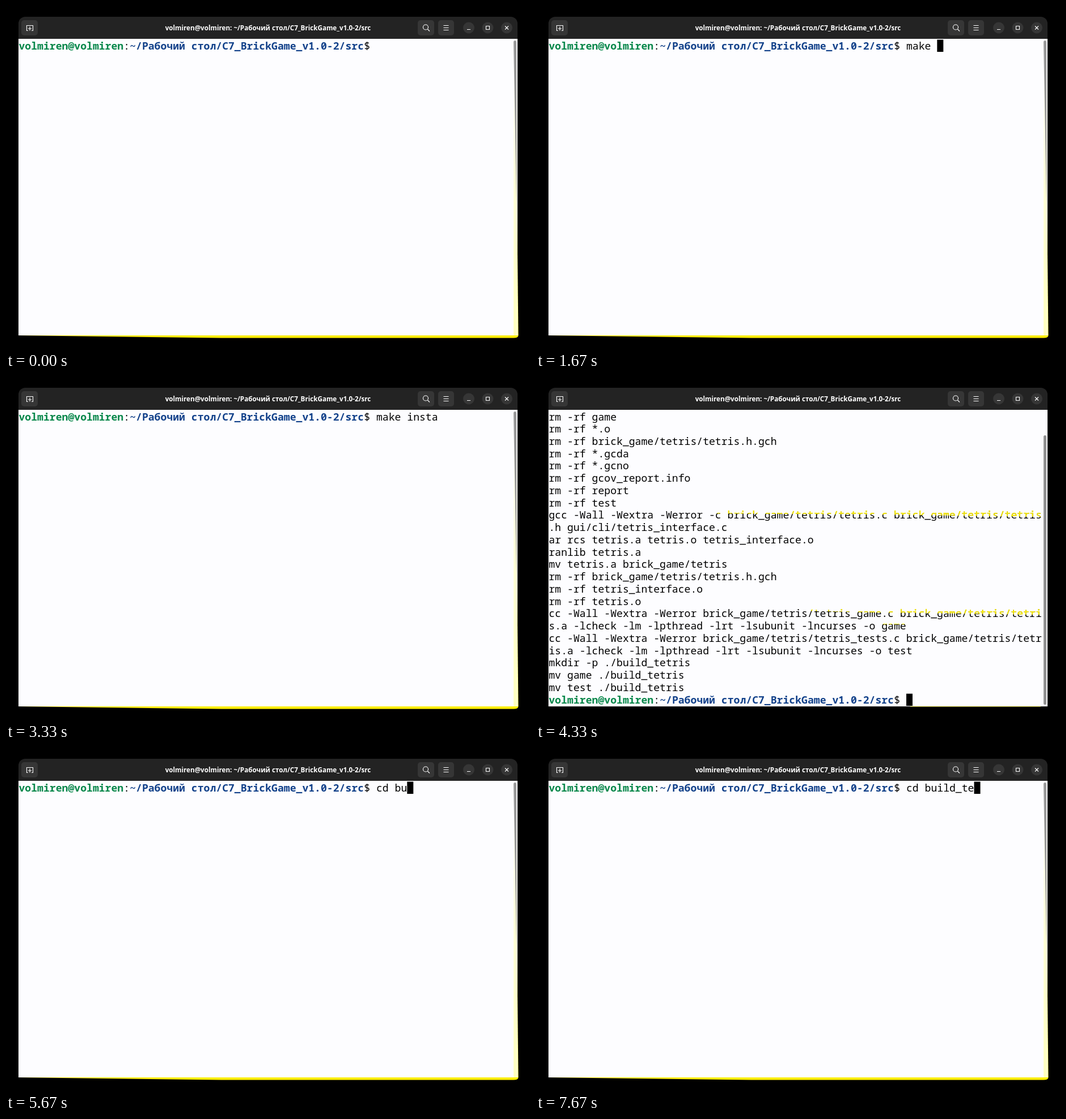
Animation of 924 by 606 pixels, one loop 8000 ms. Source, as an HTML page:

```html
<!DOCTYPE html>
<html lang="ru">
<head>
<meta charset="utf-8">
<style>
  html, body { margin: 0; width: 100%; height: 100%; overflow: hidden; background: #000; }
  svg { display: block; }
  text { white-space: pre; }
  .term text { font: 18.12px "Noto Sans Mono", monospace; }
  .term .b { font-weight: 700; }
  .title { font: 700 11.65px "Open Sans", sans-serif; fill: #fff; text-anchor: middle; }
  .icon { fill: none; stroke: #fff; stroke-width: 1.1; }
</style>
</head>
<body>
<svg width="924" height="606" viewBox="0 0 924 606">
  <defs>
    <linearGradient id="strip" x1="0" y1="0" x2="0" y2="1">
      <stop offset="0" stop-color="#fdfdff"/>
      <stop offset=".4" stop-color="#ffffdc"/>
      <stop offset="1" stop-color="#ffffc0"/>
    </linearGradient>
    <clipPath id="tint">
      <path d="M300 230H890V247L600 243L300 241Z M470 404H890V420L600 416L470 413Z M600 428H655V437H600Z"/>
    </clipPath>
  </defs>
  <rect width="924" height="606"/>
  <path d="M22 59V31A12 12 0 0 1 34 19H890A12 12 0 0 1 902 31V59Z" fill="#232323"/>
  <g fill="#363636">
    <rect x="27" y="25" width="29" height="27" rx="5"/>
    <rect x="726" y="25" width="29" height="27" rx="5"/>
    <rect x="762" y="25" width="28" height="27" rx="5"/>
    <circle cx="816" cy="38.5" r="10"/>
    <circle cx="849.5" cy="38.5" r="10"/>
    <circle cx="883" cy="38.5" r="10"/>
  </g>
  <path class="icon" d="M39 43.5H36.5V34.5H47.5V43.5H45 M42 36.5V43.5 M38.8 40H45.2
    M743.5 41L747 44.5 M771.5 34.5H780.5 M771.5 38.5H780.5 M771.5 42.5H780.5
    M813 41.5H819 M846.5 35.5H852.5V41.5H846.5Z M880 35.5L886 41.5 M886 35.5L880 41.5"/>
  <circle class="icon" cx="740" cy="37.5" r="4.5"/>
  <text class="title" x="462" y="42.5"></text>
  <rect x="22" y="58" width="880" height="524" fill="#fdfdff"/>

  <g id="blank">
    <rect x="895" y="100" width="6" height="482" fill="url(#strip)"/>
    <path d="M895 64Q895 61 897.5 61T900 64L900.5 370L898 230Z" fill="#999"/>
    <path d="M901 340L903.5 582H902Z" fill="#ffff80"/>
    <path d="M22 582H903.5Q903 586.5 895 586.5H380Z" fill="#ffee00"/>
  </g>
  <g id="full">
    <rect x="895" y="103" width="5" height="476" rx="2.5" fill="#929292"/>
    <path d="M660 582H890" stroke="#f4ec50"/>
  </g>

  <g class="term">
    <g id="log"></g>
    <g id="logTint" fill="#fff000" stroke="#fff000" stroke-width=".4" clip-path="url(#tint)"></g>
    <g id="line">
      <text class="b" y="17" fill="#07874a"></text>
      <text y="17"></text>
      <text class="b" y="17" fill="#12418a"></text>
      <text y="17"></text>
      <rect id="cursor" width="11" height="21.5"/>
    </g>
  </g>
</svg>
<script>
const $ = s => document.querySelector(s);
const LEFT = 22.5, TOP = 59.5, CELL = 10.87, ROW = 21.74, LOOP = 8000;
const user = "volmiren@volmiren", path = "~/Рабочий стол/C7_BrickGame_v1.0-2/src";
const promptLen = user.length + path.length + 3;

const output = `rm -rf game
rm -rf *.o
rm -rf brick_game/tetris/tetris.h.gch
rm -rf *.gcda
rm -rf *.gcno
rm -rf gcov_report.info
rm -rf report
rm -rf test
gcc -Wall -Wextra -Werror -c brick_game/tetris/tetris.c brick_game/tetris/tetris
.h gui/cli/tetris_interface.c
ar rcs tetris.a tetris.o tetris_interface.o
ranlib tetris.a
mv tetris.a brick_game/tetris
rm -rf brick_game/tetris/tetris.h.gch
rm -rf tetris_interface.o
rm -rf tetris.o
cc -Wall -Wextra -Werror brick_game/tetris/tetris_game.c brick_game/tetris/tetri
s.a -lcheck -lm -lpthread -lrt -lsubunit -lncurses -o game
cc -Wall -Wextra -Werror brick_game/tetris/tetris_tests.c brick_game/tetris/tetr
is.a -lcheck -lm -lpthread -lrt -lsubunit -lncurses -o test
mkdir -p ./build_tetris
mv game ./build_tetris
mv test ./build_tetris`.split("\n");

const rows = output.map((s, i) =>
  `<text x="${LEFT}" y="${TOP + 17 + i * ROW}">${s}</text>`);
$("#log").innerHTML = rows.join("");
$("#logTint").innerHTML = rows[8] + rows[16] + rows[17];
$(".title").textContent = `${user}: ${path}`;

const [who, colon, dir, typed] = document.querySelectorAll("#line text");
const put = (el, s, col) => {
  el.textContent = s;
  el.setAttribute("x", LEFT + col * CELL);
};
put(who, user, 0);
put(colon, ":", user.length);
put(dir, path, user.length + 1);

const show = (s, on) => $(s).style.display = on ? "" : "none";

function draw(now) {
  const t = now % LOOP;
  const step = Math.floor(t * 3 / 1000 + 0.011);   // three keystrokes a second
  const built = step === 13;
  let cmd = "";
  if (step < 13) cmd = "make install".slice(0, step);
  else if (step === 14) cmd = "c";
  else if (!built) cmd = "cd build_tetris".slice(0, step - 12);

  put(typed, "$ " + cmd, promptLen - 2);
  $("#cursor").setAttribute("x", LEFT + (promptLen + cmd.length) * CELL);
  show("#cursor", step !== 0 && step !== 10);
  $("#line").setAttribute("transform", `translate(0 ${TOP + (built ? output.length * ROW : 0)})`);
  show("#log", built);
  show("#logTint", built);
  show("#full", built);
  show("#blank", !built);
}

const start = performance.now();
function tick(now) {
  draw(Math.max(0, now - start));
  requestAnimationFrame(tick);
}
draw(0);
requestAnimationFrame(tick);
</script>
</body>
</html>
```
